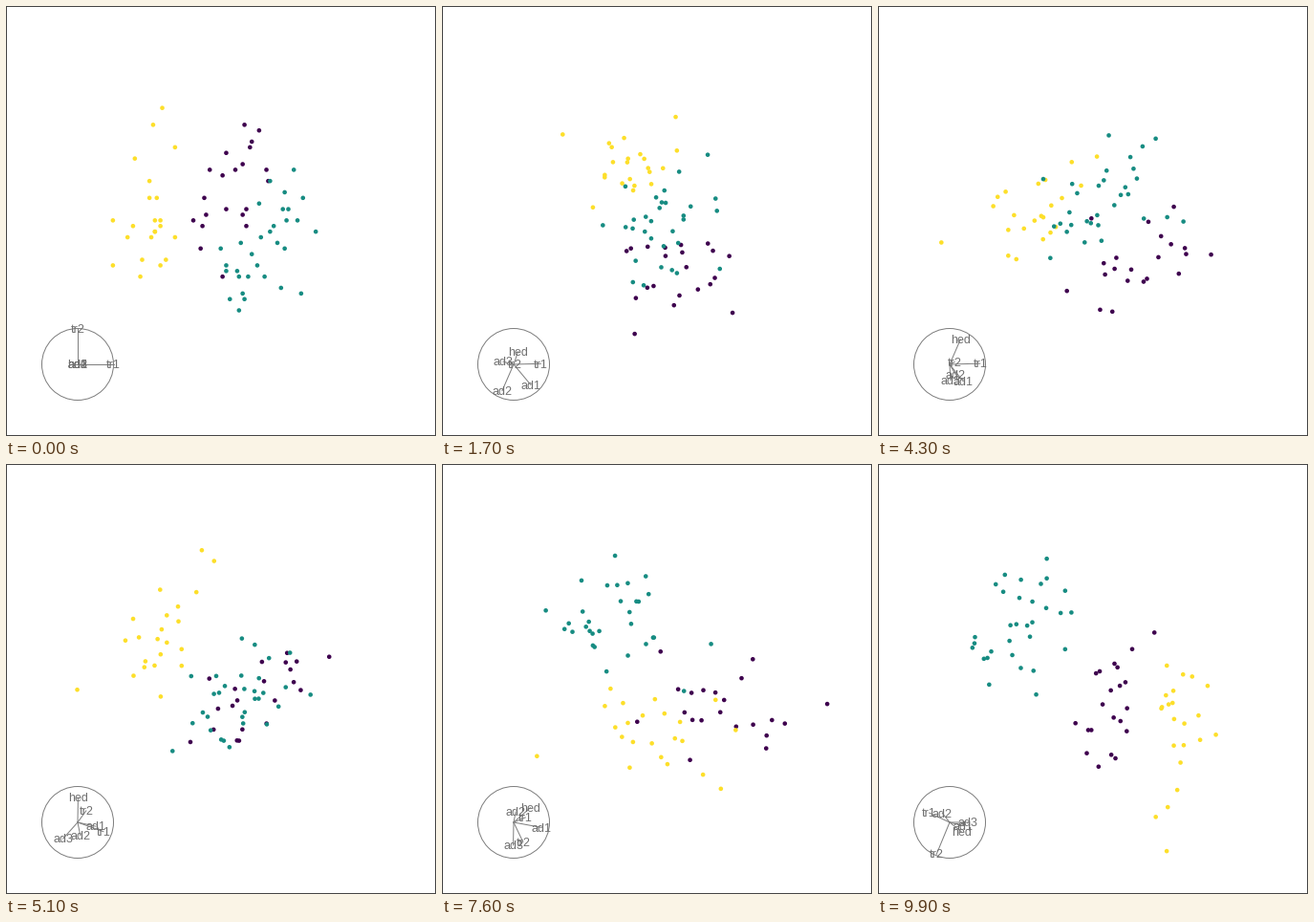
A matplotlib script for the animation above (10000 ms loop, 450x450 px).

```python
import numpy as np
import matplotlib.pyplot as plt
from matplotlib.animation import FuncAnimation

SIZE, DPI, FRAMES, STEP_MS = 450, 100, 100, 100
PX = 72 / DPI
GREY = "#7f7f7f"
MID, SCALE = 225, 229.5
HUB, RADIUS = np.array([75, 375]), 37.5
FLIP = np.array([1, -1])
LABELS = ["tr1", "tr2", "hed", "ad1", "ad2", "ad3"]
RANGES = np.array([120, 39, 15, 41, 8, 68])
SIZE_LINK = np.array([.75, .8, .7, .45, 0, .25])  # correlation with body size

# Beetle species: count, colour, mean and spread of each measurement
SPECIES = [
    (21, "#3e004e", (183, 129.6, 51.2, 146.2, 14.1, 104.9),
     (12, 7, 2.2, 5.6, .9, 6.2)),
    (22, "#fddf2a", (138, 125, 51.6, 138.3, 10.1, 106.6),
     (9, 8, 2.8, 4.1, 1, 5.9)),
    (31, "#178c82", (201, 119.3, 48.9, 124.6, 14.3, 81),
     (14, 6.6, 2.3, 4.6, 1.1, 8.9)),
]

# Key views of the tour: frame, horizontal and vertical weights
VIEWS = [
    (0, (1, 0, 0, 0, 0, 0), (0, 1, 0, 0, 0, 0)),
    (17, (.75, .02, .12, .48, -.31, -.29), (.01, 0, .37, -.6, -.76, .08)),
    (34, (.64, -.01, .4, .2, .24, .55), (.19, -.27, .43, -.8, -.13, -.29)),
    (51, (.72, .23, 0, .51, .08, -.4), (-.27, .32, .69, -.12, -.37, -.45)),
    (61, (.64, .43, .12, .54, .2, -.23), (-.25, -.03, .56, -.11, -.22, -.77)),
    (76, (.32, .27, .45, .77, .05, 0), (.13, -.56, .4, -.16, .29, -.64)),
    (99, (-.56, -.36, .32, .37, -.2, .49), (.27, -.91, -.27, -.1, .26, 0)),
]


def measure(rng, count, mean, spread):
    """Whole-number measurements that share a body size factor."""
    body = rng.normal(size=(count, 1))
    noise = rng.normal(size=(count, len(mean)))
    z = SIZE_LINK * body + np.sqrt(1 - SIZE_LINK ** 2) * noise
    z = (z - z.mean(0)) / z.std(0)
    return np.round(mean + z * spread)


def orthonormal(m):
    u, _, vt = np.linalg.svd(m, full_matrices=False)
    return u @ vt


def geodesic(a, b, t):
    """Turn basis a towards basis b along the shortest path of planes."""
    va, s, vbt = np.linalg.svd(a.T @ b)
    vb = vbt.T
    if np.linalg.det(va @ vbt) < 0:
        vb[:, 1] *= -1
        s[1] *= -1
    s = np.clip(s, -1, 1)
    tau = np.arccos(s)
    start = a @ va
    ortho = (b @ vb - start * s) / np.maximum(np.sin(tau), 1e-9)
    plane = start * np.cos(t * tau) + ortho * np.sin(t * tau)
    spin = va @ vb.T
    phi = t * np.arctan2(spin[1, 0], spin[0, 0])
    c, d = np.cos(phi), np.sin(phi)
    return plane @ va.T @ np.array([[c, -d], [d, c]])


TIMES = [view[0] for view in VIEWS]
BASES = [orthonormal(np.array(view[1:], float).T) for view in VIEWS]


def basis_at(i):
    k = min(np.searchsorted(TIMES, i, side="right") - 1, len(TIMES) - 2)
    t = (i - TIMES[k]) / (TIMES[k + 1] - TIMES[k])
    return geodesic(BASES[k], BASES[k + 1], t)


rng = np.random.default_rng(7)
data = np.vstack([measure(rng, n, np.array(m), np.array(s))
                  for n, _, m, s in SPECIES])
data = (data - data.mean(0)) / RANGES
colors = [color for n, color, *_ in SPECIES for _ in range(n)]

fig = plt.figure(figsize=(SIZE / DPI, SIZE / DPI), dpi=DPI, facecolor="white")
ax = fig.add_axes([0, 0, 1, 1])
ax.set(xlim=(0, SIZE), ylim=(SIZE, 0))
ax.axis("off")
# Half of the frame line falls outside the stage
ax.add_patch(plt.Rectangle((0, 0), SIZE, SIZE, fill=False, ec="#444444",
                           lw=2 * PX, snap=False))
ax.add_patch(plt.Circle(HUB, RADIUS, fill=False, ec=GREY, lw=PX))
spokes = [ax.plot([], [], color=GREY, lw=PX)[0] for _ in LABELS]
names = [ax.text(0, 0, s, color="#707070", fontsize=12.5 * PX,
                 family="Liberation Sans", ha="center", va="center")
         for s in LABELS]
dots = ax.scatter(data[:, 0], data[:, 1], s=(4.6 * PX) ** 2, c=colors,
                  linewidths=0, zorder=3)


def draw(i):
    basis = basis_at(i)
    dots.set_offsets(MID + SCALE * (data @ basis) * FLIP)
    for spoke, name, tip in zip(spokes, names, HUB + RADIUS * basis * FLIP):
        spoke.set_data([HUB[0], tip[0]], [HUB[1], tip[1]])
        name.set_position(tip + [0, 1.2])
    return [dots, *spokes, *names]


anim = FuncAnimation(fig, draw, frames=FRAMES, interval=STEP_MS,
                     repeat=True, repeat_delay=0)
plt.show()
```
